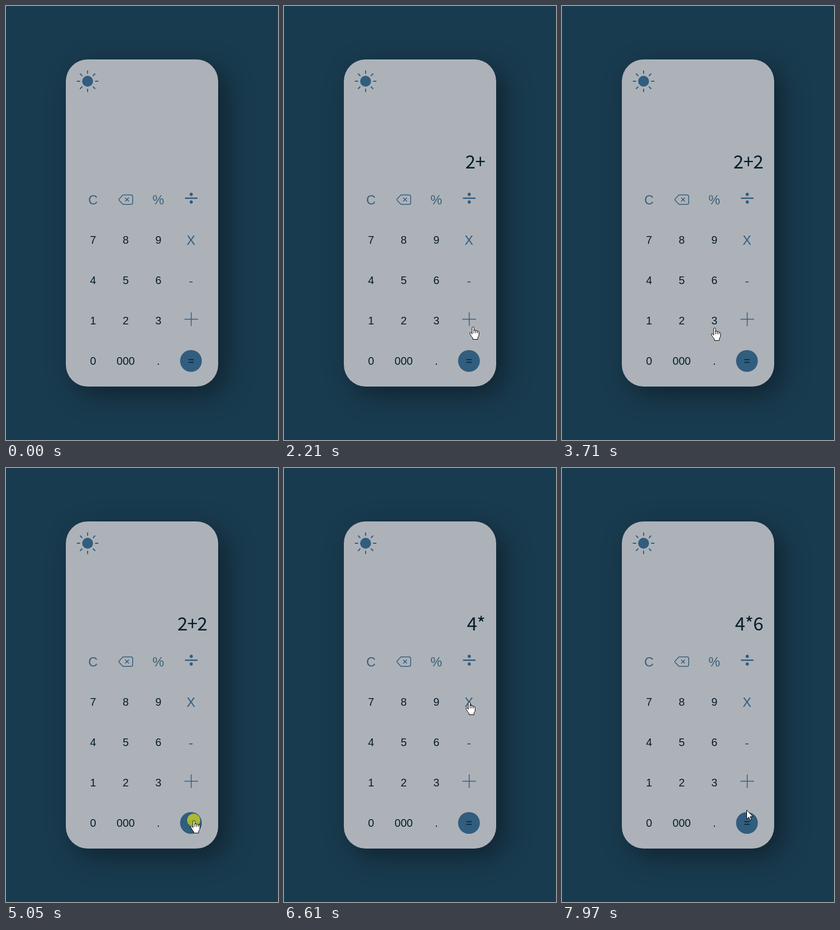
Recreate the animation shown at these times as an HTML page. Size 500 by 796 pixels, loop 8 s.

```html
<!DOCTYPE html>
<html lang="en">
<head>
<meta charset="utf-8">
<title>Calculator</title>
<style>
  html, body { margin: 0; width: 100%; height: 100%; overflow: hidden; background: #193b4f; }
  .card {
    position: absolute; left: 110px; top: 98px; width: 280px; height: 600px;
    border-radius: 40px; background: #adb2b9; box-shadow: 15px 15px 50px rgba(0, 0, 0, .4);
  }
  svg { position: absolute; left: 0; top: 0; }
  text { font-family: "Liberation Sans", Arial, sans-serif; text-anchor: middle; }
  .digit { font-size: 20px; fill: #031d29; }
  .sign { font-size: 24px; fill: #315d7e; }
  .muted { fill: #3a6076; }
  #display {
    font: 300 34px "Noto Sans CJK JP", "Noto Sans CJK SC", "Noto Sans", sans-serif;
    letter-spacing: -.5px; text-anchor: end; fill: #031d29;
  }
  .line { fill: none; stroke: #315d7e; stroke-linecap: round; stroke-linejoin: round; }
  .dot { fill: #315d7e; }
  .pointer { fill: #fff; stroke: #000; stroke-linejoin: round; }
</style>
</head>
<body>
<div class="card"></div>
<svg width="500" height="796" viewBox="0 0 500 796">
  <circle class="dot" cx="150" cy="138" r="10"/>
  <g id="rays" class="line" stroke-width="2"></g>
  <text id="display" x="370" y="298"></text>
  <g id="keys"></g>

  <!-- backspace, divide, plus -->
  <path class="line" stroke-width="1.5" d="M215 346.5H230a2.8 2.8 0 0 1 2.8 2.8V361a2.8 2.8 0 0 1 -2.8 2.8H215L207.8 356.2Q207 355 207.8 354ZM219.5 352l6 6m0 -6l-6 6"/>
  <path class="line" stroke-width="2.4" stroke-linecap="butt" d="M330 352.5H351"/>
  <circle class="dot" cx="340.5" cy="345.5" r="2.9"/>
  <circle class="dot" cx="340.5" cy="359.5" r="2.9"/>
  <path class="line" stroke-width="1.5" d="M328.5 574.5H352.5M340.5 562.5V586.5"/>

  <g id="cursor">
    <circle id="press" r="12" fill="rgba(225,230,20,.68)"/>
    <path id="arrow" class="pointer" d="M.5 .5V17L4.3 13.3L6.8 19L9.2 18L6.8 12.3H11.8Z"/>
    <g id="hand">
      <path class="pointer" d="M-1.2 2.2Q-1.2 .5 .5 .5T2.2 2.2V7.5Q2.6 6 4 6.2T5.5 8Q6 6.8 7.3 7.2T8.6 9Q9.2 7.9 10.3 8.4T11.4 10.3V15Q11.4 17.5 9.2 20V23.5H.2V21Q-2.2 18.7 -3.4 16.2L-5.2 13.2Q-6 11.5 -4.7 10.9T-2.3 12.2L-1.2 13.6Z"/>
      <path fill="none" stroke="#000" d="M2.2 7V12M5.5 8V12M8.6 9V12"/>
    </g>
  </g>
</svg>
<script>
const $ = id => document.getElementById(id);
const DURATION = 8000;
const COLUMNS = [160, 220, 280, 340];
const ROWS = [355, 429, 503, 577, 651];
const LABELS = [['C', '', '%', ''], ['7', '8', '9', 'X'], ['4', '5', '6', '-'],
                ['1', '2', '3', ''], ['0', '000', '.', '=']];

// Bursts of activity. Path points are [step, x, y]; a press starts at step
// `down`, and on release at step `up` the display shows `shows`.
const BURSTS = [
  { from: 520, to: 1280, steps: 12, down: 6, up: 8, shows: '2',
    path: [[0, 315, 737], [1, 300, 690], [3, 258, 602], [5, 219, 576], [8, 219, 574], [11, 222, 566]] },
  { from: 1340, to: 1700, steps: 6, path: [[3, 327, 582], [5, 354, 588]] },
  { from: 1950, to: 2030, steps: 2, down: 0, up: 1, shows: '2+', path: [] },
  { from: 2210, to: 2900, steps: 11, path: [[1, 340, 587], [6, 240, 578], [10, 218, 572]] },
  { from: 3030, to: 3780, steps: 12, down: 0, up: 1, shows: '2+2',
    path: [[4, 218, 572], [8, 263, 584], [10, 280, 590], [11, 286, 592]] },
  { from: 3850, to: 4250, steps: 7, path: [[4, 337, 637], [6, 345, 646]] },
  { from: 5050, to: 5180, steps: 2, down: 0, up: 1, shows: '4', path: [] },
  { from: 5380, to: 5850, steps: 8, path: [[1, 340, 610], [4, 327, 500], [6, 331, 420], [7, 334, 403]] },
  { from: 5990, to: 6120, steps: 3, path: [[2, 340, 408]] },
  { from: 6320, to: 6400, steps: 2, path: [[1, 340, 429]] },
  { from: 6540, to: 7020, steps: 8, down: 0, up: 1, shows: '4*',
    path: [[1, 340, 429], [5, 290, 492], [7, 279, 502]] },
  { from: 7220, to: 7560, steps: 6, down: 0, up: 1, shows: '4*6',
    path: [[2, 279, 502], [5, 274, 481]] },
  { from: 7700, to: 7970, steps: 5, path: [[2, 318, 580], [4, 339, 627]] },
];

function buildFace() {
  let rays = '';
  for (let i = 0; i < 8; i++)
    rays += `<path d="M164.5 138H169" transform="rotate(${i * 45} 150 138)"/>`;
  $('rays').innerHTML = rays;

  let keys = '<circle class="dot" cx="340" cy="651" r="20"/>';
  LABELS.forEach((row, r) => row.forEach((label, c) => {
    const isSign = r === 0 || (c === 3 && label !== '=');
    const style = isSign ? (r === 0 ? 'sign muted' : 'sign') : 'digit';
    const baseline = ROWS[r] + (isSign ? 8.5 : 7);
    keys += `<text class="${style}" x="${COLUMNS[c]}" y="${baseline}">${label}</text>`;
  }));
  $('keys').innerHTML = keys;
}

function alongPath(points, step) {
  const next = points.findIndex(p => p[0] >= step);
  if (next < 0) return points[points.length - 1].slice(1);
  if (next === 0) return points[0].slice(1);
  const [s0, x0, y0] = points[next - 1], [s1, x1, y1] = points[next];
  const k = (step - s0) / (s1 - s0);
  return [x0 + (x1 - x0) * k, y0 + (y1 - y0) * k];
}

function stateAt(time) {
  const state = { position: null, pressed: false, display: '' };
  for (const { from, to, steps, down, up, shows, path } of BURSTS) {
    if (time < from) break;
    const step = Math.min(steps - 1, Math.floor((time - from) / (to - from) * (steps - 1) + .1));
    const start = state.position ? [[-1, ...state.position]] : [];
    state.position = alongPath([...start, ...path], step);
    state.pressed = step >= down && step < up;
    if (step >= up) state.display = shows;
  }
  return state;
}

function render(now) {
  const { position, pressed, display } = stateAt(now % DURATION);
  const show = (id, on) => $(id).setAttribute('visibility', on ? 'visible' : 'hidden');
  const [x, y] = position || [0, 0];
  const overKey = COLUMNS.some(cx => ROWS.some(cy => Math.hypot(x - cx, y - cy) <= 20));
  $('display').textContent = display;
  $('cursor').setAttribute('transform', `translate(${Math.round(x)} ${Math.round(y)})`);
  show('press', position && pressed);
  show('hand', position && overKey);
  show('arrow', position && !overKey);
}

buildFace();
const startTime = performance.now();
function tick() {
  render(performance.now() - startTime);
  requestAnimationFrame(tick);
}
tick();
</script>
</body>
</html>
```
